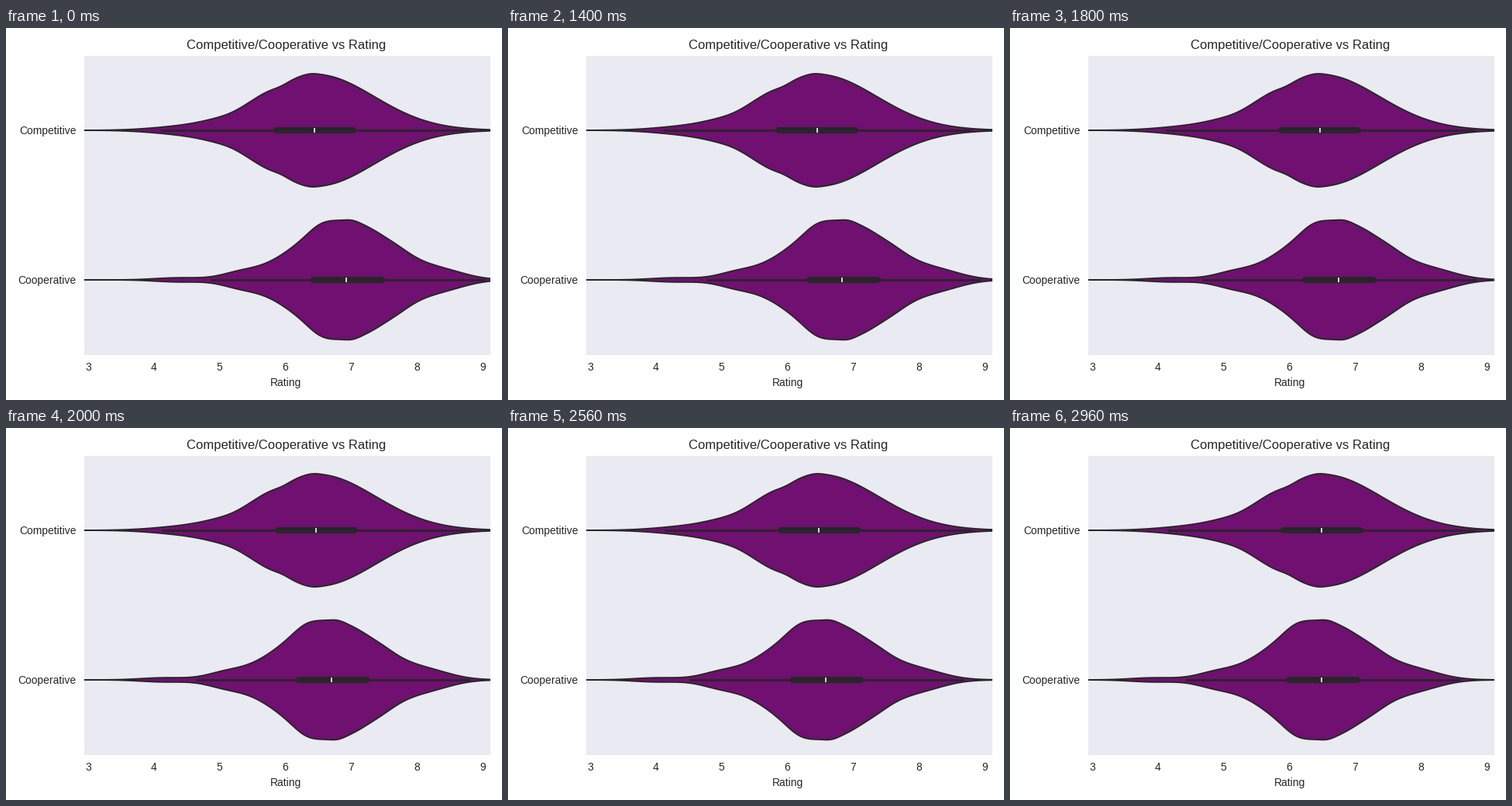
A matplotlib script that plays this animation: 640 by 480 pixels, repeating every 5 s.

```python
import numpy as np
import matplotlib.pyplot as plt
from matplotlib.animation import FuncAnimation

FRAMES, INTERVAL = 125, 40
START, STEPS = 25, 49           # resting frames, then a linear glide
INK, PURPLE, PANEL = "#262626", "#701070", "#EAEAF2"
LEFT, RIGHT, TOP, BOTTOM = 101, 625, 36, 422
LINE = 1.3

plt.rcParams.update({
    "font.family": "Liberation Sans", "font.size": 10,
    "text.color": INK, "axes.labelcolor": INK,
    "xtick.color": INK, "ytick.color": INK,
    "lines.solid_capstyle": "round",
})

fig = plt.figure(figsize=(6.4, 4.8), dpi=100, facecolor="white")
ax = fig.add_axes([LEFT / 640, 1 - BOTTOM / 480,
                   (RIGHT - LEFT) / 640, (BOTTOM - TOP) / 480],
                  facecolor=PANEL)
# Data units are stage pixels, so the tick positions carry the rating scale.
ax.set_xlim(LEFT, RIGHT)
ax.set_ylim(BOTTOM, TOP)
ax.set_xticks([106 + 84.85 * i for i in range(7)], range(3, 10))
ax.set_yticks([132, 325], ["Competitive", "Cooperative"])
ax.tick_params(axis="x", length=0, pad=6.3)
ax.tick_params(axis="y", length=0, pad=7.4)
ax.spines[:].set_visible(False)
ax.set_title("Competitive/Cooperative vs Rating", fontsize=12, x=0.497, pad=6.6)
ax.set_xlabel("Rating", x=0.497, labelpad=4.3)

X = np.arange(0, 720)


def density(bumps):
    """Sum of Gaussians, each given as (height, centre, spread)."""
    return sum(h * np.exp(-0.5 * ((X - c) / s) ** 2) for h, c, s in bumps)


class Violin:
    def __init__(self, y, bumps, q1, median, q3, shift):
        self.y, self.shift = y, shift
        self.half = density(bumps)
        self.median = median
        self.box = np.array([q1, q3])
        self.whisker = self.box + 1.5 * (q3 - q1) * np.array([-1, 1])
        self.body, = ax.fill([0], [0], fc=PURPLE, ec=INK, lw=LINE)
        self.whisker_line, = ax.plot([], [], color=INK, lw=LINE * 1.5)
        self.box_line, = ax.plot([], [], color=INK, lw=LINE * 4.4)
        self.mark, = ax.plot([], [], "|", color="white", ms=4.7, mew=1.15)

    def place(self, t):
        dx = self.shift * t
        xs = np.concatenate([X, X[::-1]]) + dx
        ys = np.concatenate([self.y - self.half, self.y + self.half[::-1]])
        self.body.set_xy(np.column_stack([xs, ys]))
        self.whisker_line.set_data(self.whisker + dx, [self.y] * 2)
        self.box_line.set_data(self.box + dx, [self.y] * 2)
        self.mark.set_data([self.median + dx], [self.y])
        return self.body, self.whisker_line, self.box_line, self.mark


# One main bell each, plus small bumps and dents along its flanks.
competitive = [(72, 400, 75), (2.2, 215, 38), (-2.3, 293, 18),
               (-3, 355, 11), (1.2, 393, 9)]
cooperative = [(76, 438, 63), (2.6, 222, 30), (5.2, 300, 23), (5.6, 405, 15),
               (1.5, 447, 8), (1.5, 508, 14), (5.8, 570, 28)]

violins = [
    Violin(132, competitive, 348.5, 398.2, 447.5, 4),
    Violin(325, cooperative, 396.5, 439, 484.5, -37),
]


def draw(n):
    t = np.clip((n - START) / STEPS, 0, 1)
    return [part for v in violins for part in v.place(t)]


anim = FuncAnimation(fig, draw, frames=FRAMES, interval=INTERVAL,
                     repeat=True, repeat_delay=0)
plt.show()
```
